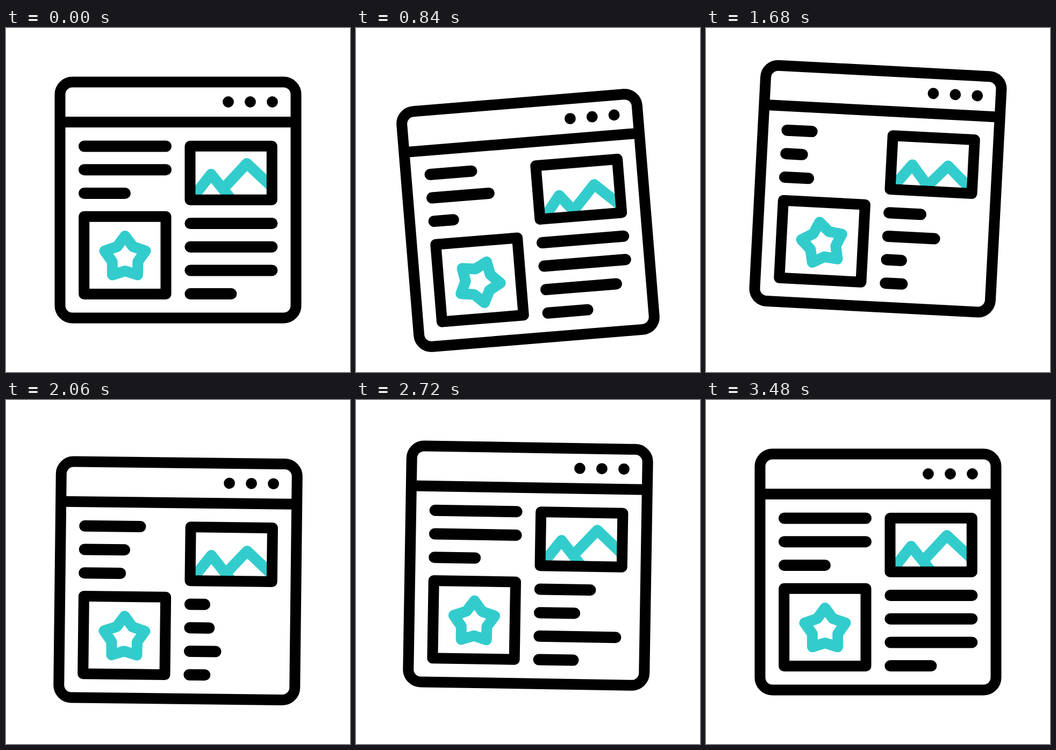
Recreate the animation shown at these times as an HTML page. Size 640 by 640 pixels, loop 3600 ms.

```html
<!DOCTYPE html>
<html lang="en">
<head>
<meta charset="utf-8">
<title>Web page layout</title>
<style>
  html, body { margin: 0; width: 100%; height: 100%; overflow: hidden; background: #fff; }
  svg { display: block; width: 100%; height: 100%; }
  .ink { fill: none; stroke: #000; stroke-width: 20; stroke-linejoin: round; }
  .bars { stroke: #000; stroke-width: 21; stroke-linecap: round; }
  .accent { fill: none; stroke: #33cccc; stroke-width: 20; stroke-linejoin: round; }
</style>
</head>
<body>
<svg viewBox="0 0 640 640">
  <defs>
    <clipPath id="view"><rect x="352" y="229" width="134" height="82"/></clipPath>
  </defs>
  <g id="page">
    <g clip-path="url(#view)">
      <path id="hillLeft" class="accent" d="M342 322.5 L381.5 272 L433 336"/>
      <path id="hillRight" class="accent" d="M408 295 L448 252 L506 306"/>
    </g>
    <path id="star" class="accent"/>
    <rect class="ink" x="100.5" y="100.5" width="439" height="439" rx="23"/>
    <path class="ink" d="M100 175 H540"/>
    <rect class="ink" x="342.5" y="219.7" width="152.3" height="100"/>
    <rect class="ink" x="145.2" y="350.7" width="152.3" height="144.3"/>
    <circle cx="413.5" cy="137.5" r="10.4"/>
    <circle cx="454.5" cy="137.5" r="10.4"/>
    <circle cx="495.5" cy="137.5" r="10.4"/>
    <g id="bars" class="bars"></g>
  </g>
</svg>
<script>
const LOOP = 3600;
const BAR = { full: 152, min: 27, gap: 43.7, delay: 180, span: 2420 };
const $ = id => document.getElementById(id);
const move = (id, value) => $(id).setAttribute("transform", value);

// Progress from 0 to 1, held outside the interval
const part = (t, from, to) => Math.min(1, Math.max(0, (t - from) / (to - from)));
const ease = (t, from, to) => (1 - Math.cos(Math.PI * part(t, from, to))) / 2;
const hump = (t, from, top, to) => ease(t, from, top) - ease(t, top, to);

// Swings to alternating sides at each beat, weaker every time, then rests
function swing(amp, decay, beats) {
  const last = beats.length - 1;
  const turn = i => i === 0 || i === last ? 0 : amp * (-decay) ** (i - 1);
  return t => beats.slice(1).reduce(
    (sum, beat, i) => sum + (turn(i + 1) - turn(i)) * ease(t, beats[i], beat), 0);
}
const lift = swing(38.5, 0.68, [0, 800, 1550, 2130, 2690, 3050]);
const tilt = swing(-5, 0.67, [210, 970, 1790, 2345, 2850, 3210]);

// A paragraph of bars whose last line is half as long
function paragraph(x, y, count, first) {
  return Array.from({ length: count }, (_, i) => {
    const line = document.createElementNS("http://www.w3.org/2000/svg", "line");
    const rowY = y + i * BAR.gap;
    line.setAttribute("x1", x);
    line.setAttribute("y1", rowY);
    line.setAttribute("y2", rowY);
    $("bars").append(line);
    const order = first + (i + count - 2) % count;
    const full = i === count - 1 ? BAR.full / 2 : BAR.full;
    return { line, x, full, start: order * BAR.delay - 20 };
  });
}
const bars = [...paragraph(145.5, 220, 3, 0), ...paragraph(342.9, 363.5, 4, 3)];

$("star").setAttribute("d", "M" + Array.from({ length: 10 }, (_, i) => {
  const a = i * Math.PI / 5, r = i % 2 ? 25 : 40;
  return `${221.5 + r * Math.sin(a)} ${427 - r * Math.cos(a)}`;
}).join("L") + "Z");

function draw(t) {
  move("page", `translate(0 ${lift(t)}) rotate(${tilt(t)} 320 320)`);
  move("star", `rotate(${360 * ease(t, 640, 1810)} 221.5 423)`);
  move("hillLeft", `translate(0 ${6.3 * hump(t, 0, 800, 1600)})`);
  move("hillRight", `translate(0 ${19.5 * hump(t, 0, 1530, 2700)})`);
  for (const { line, x, full, start } of bars) {
    const shrink = hump(t, start, start + BAR.span / 2, start + BAR.span);
    line.setAttribute("x2", x + full - (full - BAR.min) * shrink);
  }
}

const begin = performance.now();
function tick() {
  draw((performance.now() - begin) % LOOP);
  requestAnimationFrame(tick);
}
tick();
</script>
</body>
</html>
```
